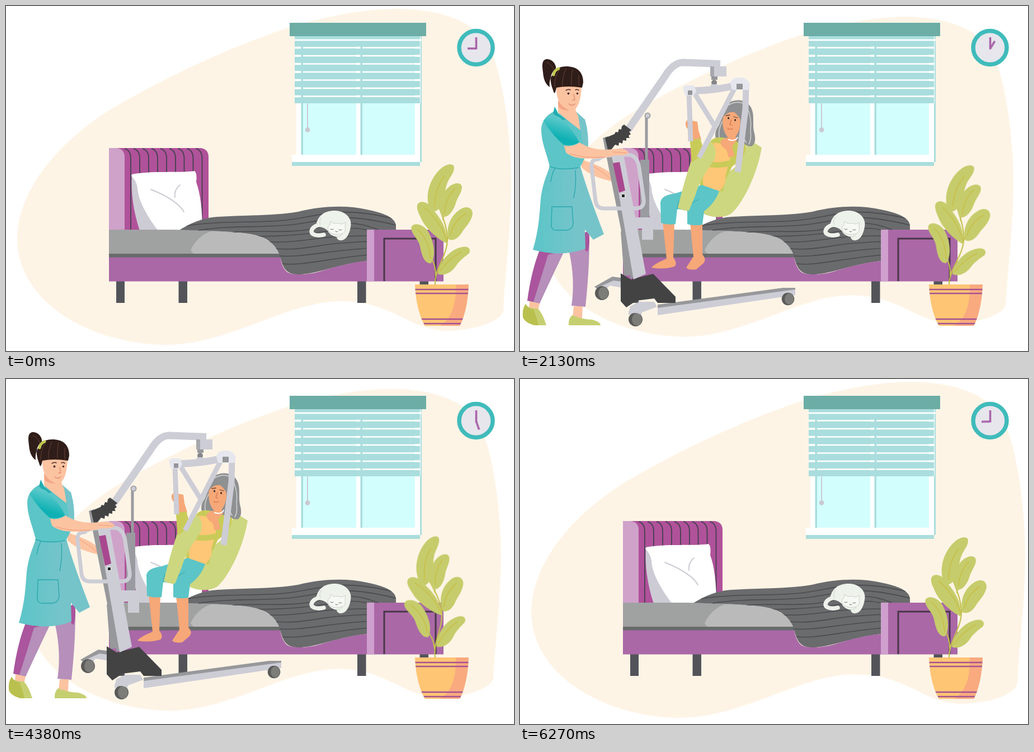
An HTML page without scripts for the animation above (6300 ms loop, 908 by 617 pixels).

```html
<!DOCTYPE html>
<html lang="en">
<head>
<meta charset="utf-8">
<title>Bedroom with patient lift</title>
<style>
html, body { margin: 0; width: 100%; height: 100%; overflow: hidden; background: #fff; }
svg { display: block; width: 100vw; height: 100vh; }
.blob, .hour, .leaves, .team { animation: 6300ms infinite; }
.blob { transform-origin: 462px 305px; animation-name: breathe; animation-timing-function: cubic-bezier(.37, 0, .63, 1); }
.hour { transform-origin: 840.5px 76px; animation-name: turn; animation-timing-function: linear; }
.leaves { transform-origin: 767px 497px; animation-name: sway; animation-timing-function: cubic-bezier(.37, 0, .63, 1); }
.team { animation-name: visit; animation-timing-function: cubic-bezier(.37, 0, .63, 1); }
@keyframes breathe { 50% { transform: scale(.9375); } }
@keyframes turn { to { transform: rotate(360deg); } }
@keyframes sway {
  0%, 100% { transform: none; }
  33.333% { transform: rotate(3deg); }
  66.667% { transform: rotate(-7.5deg); }
}
@keyframes visit {
  0%, 5.24% { transform: translateX(60px); opacity: 0; }
  9.52%, 83.33% { transform: none; opacity: 1; }
  87.62%, 100% { transform: translateX(60px); opacity: 0; }
}
.line { fill: none; stroke-linecap: round; stroke-linejoin: round; }
.metal { fill: #cdcdd6; }
.steel { fill: #97989b; }
.bar { fill: none; stroke: #cdcdd6; stroke-linejoin: round; }
.skin { fill: #f6a878; }
.fair { fill: #fcc3a1; }
.teal { fill: #5cc5c7; }
</style>
</head>
<body>
<svg viewBox="0 0 908 617" preserveAspectRatio="none">
<defs>
  <path id="rib" d="M-11 0Q0 3 0 18V146"/>
  <g id="slit"><path d="M516 0H740" stroke-width="2.400"/><path d="M516 0H527M626 0H634M731 0H740" stroke-width="3.400"/></g>
  <g id="wheel"><circle r="12.500" fill="#5a5a59"/><ellipse cx="2.500" rx="9" ry="11" fill="#7c7c78"/></g>
  <linearGradient id="skirt"><stop offset=".1" stop-color="#5fc5c8"/><stop offset=".6" stop-color="#75c4ca"/></linearGradient>
  <linearGradient id="sleeve" x1=".7" y1="0" x2=".3" y2="1"><stop offset=".15" stop-color="#5fcacc"/><stop offset=".7" stop-color="#0fb1b4"/></linearGradient>
  <clipPath id="pot"><path d="M731 498H827C826 530 819 558 811 572H749C740 558 732 530 731 498Z"/></clipPath>
  <clipPath id="quilt"><path id="quiltShape" d="M306 403C330 388 350 379 378 377C430 374 480 375 522 368C565 357 610 356 645 364C680 371 697 380 697 394V400H645V456C590 462 550 482 518 480C496 478 494 462 488 443C480 424 465 415 450 411C420 404 360 400 306 403Z"/></clipPath>
</defs>

<path class="blob" fill="#fef4e6" d="M20 415C22 330 90 245 190 183C280 130 400 73 507 38C600 10 660 5 705 5C790 8 848 30 872 92C890 145 903 230 903 320C902 410 892 480 889 544C886 562 850 578 790 581C720 580 690 528 600 528C500 528 400 606 284 606C150 604 20 530 20 415Z"/>

<g id="window">
  <path fill="#aadddd" d="M739 54H743V279H740V286H511V279H739Z"/>
  <path fill="#fff" d="M519 174H740V279H511V266H519Z"/>
  <path fill="#aadddd" d="M527.500 174H531V266H527.500ZM633.500 174H637V266H633.500Z"/>
  <path fill="#d3fefe" d="M531 174H626V266H531ZM637 174H731V266H637Z"/>
  <path fill="#aadddd" d="M516 54H743V174H516Z"/>
  <path fill="#fff" d="M516 59.500H743V62.200H516ZM740 54H741V174H740Z"/>
  <g stroke="#fff">
    <use href="#slit" y="74.500"/><use href="#slit" y="89"/><use href="#slit" y="103.500"/><use href="#slit" y="118"/>
    <use href="#slit" y="132.500"/><use href="#slit" y="147"/><use href="#slit" y="161.500"/>
  </g>
  <path fill="#aadddd" d="M527.500 72H531V174H527.500ZM633.500 72H637V174H633.500Z"/>
  <path fill="#6cada6" d="M507 30H751V54H507Z"/>
  <path class="line" stroke="#cbcbd4" stroke-width="2" d="M539 175V220"/><circle cx="539" cy="221.500" r="4.400" fill="#c9c9d2"/>
</g>

<g id="clock">
  <circle cx="840" cy="74.500" r="30" fill="#e7e6ed" stroke="#40bbbb" stroke-width="7.500"/>
  <g fill="none" stroke="#a964a9" stroke-width="3.600"><path d="M840.500 56V77.500"/><path class="hour" d="M840.500 76H825"/></g>
</g>

<g id="bed">
  <path fill="#53545a" d="M197 492h15v39h-15zM308.500 492h15.500v39h-15.500zM628 492h15.500v39h-15.500zM739.500 492h15.500v30h-15.500z"/>
  <path fill="#b0529a" d="M184 254H348Q362 256 362 270V402H184Z"/>
  <g fill="none" stroke="#4d4255" stroke-width="2">
    <use href="#rib" x="223" y="255"/><use href="#rib" x="239" y="255"/><use href="#rib" x="255" y="255"/><use href="#rib" x="271" y="255"/>
    <use href="#rib" x="287" y="255"/><use href="#rib" x="303" y="255"/><use href="#rib" x="318.500" y="255"/><use href="#rib" x="334.500" y="255"/><use href="#rib" x="350.500" y="255"/>
  </g>
  <path fill="#cfa2ca" d="M184 254H198Q212 256 212 270V402H184Z"/>
  <path fill="#cdccd5" d="M225 302Q222 350 239 402H280L236 306Z"/>
  <path fill="#fff" d="M225 301C260 294 310 299 337 295Q342 299 340 315Q351 345 351 402H272C248 370 236 345 235 325Q233 312 224 304Z"/>
  <path class="line" stroke="#cdccd5" stroke-width="2" d="M259 328Q306 347 318 368M311 320Q300 329 302 342"/>
  <use href="#quiltShape" fill="#6a6b6d"/>
  <path fill="#a0a2a2" d="M184 400H300C360 402 420 402 450 411Q478 420 488 443H184Z"/>
  <path fill="#bababa" d="M330 437Q341 412 366 403C410 404 440 405 460 415Q480 425 488 443H335Z"/>
  <path fill="#696b6b" d="M184 443H490V450H184Z"/>
  <path fill="#aa68a7" d="M184 449.500H490Q494 470 503 476C512 482 540 481 560 475C590 466 620 458 646 456V400H782V492.500H184Z"/>
  <g clip-path="url(#quilt)" class="line" stroke="#4b4b4e" stroke-width="1.600">
    <path d="M322 393C390 383 440 389 500 383S590 355 695 381M345 401C410 391 460 398 520 390S600 368 697 392M405 405C450 400 500 408 550 398S620 382 665 400M450 412C500 412 540 408 580 402S630 396 650 402M470 422C520 424 560 413 600 412S640 410 650 412M481 434C530 438 560 426 600 424S640 420 650 422M488 447C530 450 570 438 650 433M494 461C530 465 570 452 650 445"/>
  </g>
  <path fill="#cfa0cd" d="M645 400H658V492.500H645Z"/>
  <path fill="none" stroke="#493748" stroke-width="3" d="M676 492V416H768V492"/>
</g>

<g id="cat">
  <path fill="#edf2eb" d="M554 394C556 374 571 365 590 366C610 368 619 382 616 395C614 408 608 418 600 419Q592 420 591 413Q579 411 575 402Q566 393 555 396Z"/>
  <path fill="none" stroke="#edf2eb" stroke-width="7.500" stroke-linecap="round" d="M557 392C546 396 543 405 549 408Q557 412 568 409"/>
  <path fill="#f5f8f3" stroke="#cbd2ca" d="M575 399Q575 393 579 391L580 385L586 389Q594 387 600 390L607 387L606 394Q609 406 598 408Q579 411 575 399Z"/>
  <path class="line" stroke="#68706c" d="M580 399q3 2 5 0M595 400q3 2 5 0M589 403l2 1 2-1"/>
  <path class="line" stroke="#cdd5cb" d="M563 378Q559 386 562 391M591 412Q598 414 601 407"/>
</g>

<g id="plant">
  <g class="leaves">
    <path class="line" stroke="#c3bf4c" stroke-width="2.200" d="M767 498C766 470 790 445 789 415C788 390 777 372 773 355M789 418Q795 400 808 385M768 482Q769 464 757 445M769 477Q782 462 800 452M781 382Q782 365 794 342"/>
    <g fill="#c6cc6b">
      <path d="M757 363C748 338 758 308 777 291C788 281 801 281 801 289C801 299 793 306 789 316C783 331 786 342 780 354C773 367 762 372 757 363Z"/>
      <path d="M780 377C771 360 777 340 788 327C800 314 815 314 815 325C814 335 807 342 804 352C800 367 790 379 780 377Z"/>
      <path d="M736 354C742 346 756 352 762 362C772 376 788 390 789 425C774 419 749 398 741 378C738 371 732 361 736 354Z"/>
      <path d="M792 418C785 398 794 376 810 365C822 356 834 360 834 372C832 386 820 396 815 405C808 416 800 420 792 418Z"/>
      <path d="M725 394C730 386 748 391 755 404C765 422 769 445 760 460C748 462 743 445 740 430C737 415 721 406 725 394Z"/>
      <path d="M772 479C775 455 795 435 815 431C828 428 832 437 827 443C818 450 810 456 805 464C797 477 782 484 772 479Z"/>
    </g>
    <path class="line" stroke="#c9bd45" stroke-width="1.500" d="M766 358Q767 325 784 304M784 370Q785 345 802 327M788 420Q776 384 748 361M794 410Q800 385 822 371M759 452Q757 418 735 399M776 474Q790 453 814 440"/>
  </g>
  <g clip-path="url(#pot)">
    <path fill="#fec574" d="M730 497H828V573H730Z"/>
    <path fill="#f9aa7f" d="M804 497H828V573H774Q806 556 804 497Z"/>
    <path stroke="#a45291" stroke-width="2.700" d="M730 507H828M730 514H828M730 560H828M730 568H828"/>
  </g>
</g>

<g class="team">
  <path class="fair" d="M109 274C130 282 150 288 163 300L167 314C145 310 120 300 110 288Z"/>
  <path class="line" stroke="#ef9b7b" d="M126 284Q148 296 162 309"/>

  <g id="frame">
    <path class="steel" d="M133 502L165 484L196 488V498L168 493L140 508Z"/>
    <path class="metal" d="M136 505L167 491L190 494V505L160 500L152 510Z"/>
    <use href="#wheel" x="146.500" y="513.500"/>
    <path class="steel" d="M246 534L470 504H492V510L246 545Z"/>
    <path class="metal" d="M246 540L492 507V517L246 553Z"/>
    <use href="#wheel" transform="translate(479 524) scale(.9)"/>
    <path fill="#9a9ba0" d="M223.500 198H228.500V275H231V385H215V275H223.500Z"/>
    <path class="metal" d="M206 378H238V418H218V398H208Z"/>
    <path class="bar" stroke-width="13" d="M192 223L259 126Q274 101 292 101L358 103.500"/>
    <circle cx="228" cy="196" r="4.500" fill="#cdcdd6" stroke="#a1a1a8" stroke-width="2"/>
    <path class="steel" d="M180 403L193 400L213 482H186Z"/>
    <path class="steel" d="M148 236L157 233L208 482L198 488Z"/>
    <path fill="#434344" d="M180 478L198 489L238 479L278 520V531H246L240 523L208 527L190 539L180 528Z"/>
    <path class="metal" d="M163 257L183 254L225 479L203 489Z"/>
    <path fill="#434344" d="M152 236L169 229L171 225L175 226L177 220L181 221L182 215L186 212L199 222L195 225L198 229L194 232L196 236L190 236L190 241L184 240L183 246L177 244L176 250L170 248L163 257H157Z"/>
    <path fill="#a9488f" d="M166 281L178 279L188 330L177 334Z"/>
    <path fill="#222" stroke="#eee" d="M181.500 336.500h6v6h-6z"/>
    <path class="bar" stroke-width="7" d="M140 274Q126 274 128 289L135 349Q137 362 150 362H206Q223 362 221 346L213 290Q210 266 192 266L160 267Q146 268 140 274Z"/>
    <path class="metal" d="M194 549L197 537L213 529H240L245 538L218 548L216 555Z"/>
    <use href="#wheel" x="206.500" y="560.500"/>
    <path class="metal" d="M194 553V546Q206 540 217 548V553Q206 545 194 553Z"/>
  </g>

  <g id="patient">
    <path fill="#cdd780" d="M411 240L432 253C426 292 403 348 378 371C364 380 342 379 327 371L350 315L385 288Z"/>
    <path fill="#8e9091" d="M366 180C374 167 397 164 409 176C422 190 414 210 419 228Q423 245 414 251Q402 251 395 244L385 248Q366 250 357 246Q345 236 351 221Q361 206 366 180Z"/>
    <path class="line" stroke="#d4d4d4" stroke-width="1.500" d="M405 180Q415 200 412 222Q414 239 409 247M362 206Q351 226 359 243M398 209Q397 233 404 244M371 178Q385 169 399 174"/>
    <path class="skin" d="M364 193Q378 184 392 192Q397 213 389 228L383 238L390 249L357 250L372 236Q358 218 364 193Z"/>
    <path fill="#8e9091" d="M363 199Q365 180 382 177Q394 181 396 207Q391 196 383 190Q371 188 363 199Z"/>
    <path class="line" stroke="#67483b" stroke-width="1.300" d="M368 196l7-1M382 198l7 2"/>
    <path fill="#453533" d="M371 200.500a1.600 2 0 1 0 3.200 0a1.600 2 0 1 0-3.200 0M383 204a1.600 2 0 1 0 3.200 0a1.600 2 0 1 0-3.200 0"/>
    <path class="line" stroke="#d86f50" stroke-width="1.200" d="M378 203l-3 9 4 1M371 219q5 3 9 0"/>
    <path class="skin" d="M296 208Q298 202 307 205L317 207L319 222L324 239L306 245L305 222Q295 220 296 208Z"/>
    <path class="line" stroke="#df8058" d="M298 210h10M299 214h9"/>
    <path fill="#c9cb59" d="M304 240L322 237L328 258L342 240Q354 230 375 239L404 248Q405 270 379 287L368 310L362 332L321 322L326 283Q305 291 306 269Z"/>
    <path fill="#fec777" d="M340 248Q352 240 369 252L376 270Q371 290 367 304Q370 319 355 332L330 325Q322 310 334 292Q333 262 340 248Z"/>
    <path fill="none" stroke="#c9cb59" stroke-width="10" d="M329 280Q350 288 375 281"/>
    <path class="skin" d="M358 243Q366 233 374 237L384 232L388 240L379 251L384 268L373 271L369 257Q360 253 358 243Z"/>
    <path class="line" stroke="#fff" stroke-width="2" d="M373 239Q384 243 389 235"/>
    <path class="skin" d="M255 386H276L274 450Q282 460 276 466Q256 472 235 468Q238 462 262 452ZM304 387H326V444Q334 453 328 460L315 471Q302 473 297 468L310 448Z"/>
    <path class="teal" d="M251 351Q253 338 278 335L325 320L356 331Q349 352 329 367L326 391Q312 394 299 390V366L281 363L278 390Q264 392 252 388Z"/>
    <path class="line" stroke="#3ca7ad" stroke-width="1.300" d="M281 363L284 349M299 366Q302 353 319 346"/>
    <path fill="#cdd780" d="M319 270L307 274Q295 308 282 361Q292 367 302 366L314 337Q321 310 347 276Q355 255 340 241Z"/>
    <path fill="#c9cb59" d="M304 240L322 237L327 253L319 271L307 280Z"/>
  </g>

  <g id="hanger">
    <path class="bar" stroke-width="13" d="M305 152Q350 151 386 142"/>
    <path class="bar" stroke-width="9" d="M302 155L305 242M310 153L350 218M384 146L320 271"/>
    <path class="bar" stroke-width="11" d="M404 140L403 184L389 297"/>
    <path fill="#e6e7ee" d="M291 146L296 142H311L315 152L311 160H295ZM376 138Q378 128 391 128Q405 126 411 140L408 150H379Z"/>
    <path fill="#95969a" d="M300 151h8v8h-8zM387 139h11v10h-11zM342 125h11v7h-11z"/>
    <path class="metal" d="M340 108H369V126H340ZM345 97H358V110H345Z"/>
    <path fill="#a7a8ad" d="M340 108H347V126H340Z"/>
    <circle cx="347" cy="137" r="5" fill="#85868a"/>
    <path class="metal" d="M341 140H353V149H341Z"/>
  </g>

  <g id="nurse">
    <path fill="#aa559d" d="M36 434H77Q62 470 35 532L13 527Q20 474 36 434Z"/>
    <path fill="#b68fba" d="M76 438L50 445Q38 485 24 529L35 532Q62 474 77 443ZM80 440L123 405Q126 450 117 538L92 536Q99 490 88 440Z"/>
    <path fill="#aa559d" d="M116 405L123 402Q126 425 121 440L116 436Z"/>
    <path class="fair" d="M17 528L35 532L32 546L16 541ZM96 537H112L111 559L94 557Z"/>
    <path fill="#c6cf70" d="M10 533Q15 542 32 541Q41 551 47 571H27Q9 567 5 556Q4 541 10 533ZM93 553Q110 560 129 561Q144 565 144 571H87Q86 560 93 553Z"/>
    <path fill="#b9c04e" d="M10 533Q15 542 24 542Q30 556 33 571H27Q9 567 5 556Q4 541 10 533Z"/>
    <path class="teal" d="M62 180L68 191Q82 200 101 190L116 203Q124 230 121 262L108 287L109 295H51L53 286C46 258 38 244 38 219Q40 198 62 188Z"/>
    <path fill="url(#skirt)" d="M53 287Q80 296 108 287Q120 330 150 408L131 418L116 400L117 434Q75 450 23 436C34 400 35 370 37 345C41 315 48 303 53 287Z"/>
    <path fill="#75c4ca" d="M99 188L116 203Q124 230 121 262L113 269Q112 220 99 188Z"/>
    <path class="line" stroke="#29a9ae" stroke-width="1.400" d="M57 359H93L95 388Q94 401 81 401H64Q55 401 56 388ZM53 287Q75 295 105 289M99 294Q101 320 96 343M62 291Q57 300 55 314"/>
    <path class="fair" d="M68 169L98 175Q99 190 104 196L108 222Q84 204 68 190Z"/>
    <path fill="#f3a585" d="M68 170L88 187Q76 187 69 181Z"/>
    <path class="fair" d="M65 143Q85 130 110 142Q109 174 99 184Q91 190 80 182Q64 172 65 143Z"/>
    <path fill="#2f1d19" d="M63 118C68 106 58 94 47 95C38 97 40 108 41 118C42 132 46 140 53 145C52 133 55 124 63 118ZM59 150Q50 128 60 116Q70 107 86 108Q113 110 113 137L111 146Q85 142 65 146Q62 163 59 150Z"/>
    <path class="line" stroke="#684136" d="M48 101Q59 106 61 117M70 115Q62 125 62 144M82 112Q75 128 76 142M94 113Q91 130 92 141M105 124V143"/>
    <path class="line" stroke="#c0c74f" stroke-width="5" d="M69 112Q61 115 60 123"/>
    <path class="line" stroke="#4a2c26" stroke-width="1.400" d="M82 151q4-3 8-1M99 150q4-2 6 1"/>
    <circle cx="86.500" cy="156.500" r="1.900" fill="#4a302a"/><circle cx="102.500" cy="156.500" r="1.800" fill="#4a302a"/>
    <path class="line" stroke="#e08b70" stroke-width="1.300" d="M96 158l2 10h-4M87 175q6 5 11 0"/>
    <path fill="#23adb0" d="M62 180L68 193L82 203L73 204L59 192Z"/>
    <path class="fair" d="M78 247L105 243Q125 257 153 257L180 255Q193 257 194 263Q191 268 171 267Q151 273 121 273Q95 273 82 262Z"/>
    <path class="line" stroke="#ef9b7b" stroke-width="1.200" d="M89 264Q116 273 151 270M166 261l25 2"/>
    <path fill="url(#sleeve)" d="M42 205Q55 190 72 200Q95 221 106 244Q95 252 80 250Q58 232 42 205Z"/>
    <path class="line" stroke="#72d0d1" d="M79 249Q95 252 106 244"/>
  </g>
</g>
</svg>
</body>
</html>
```
